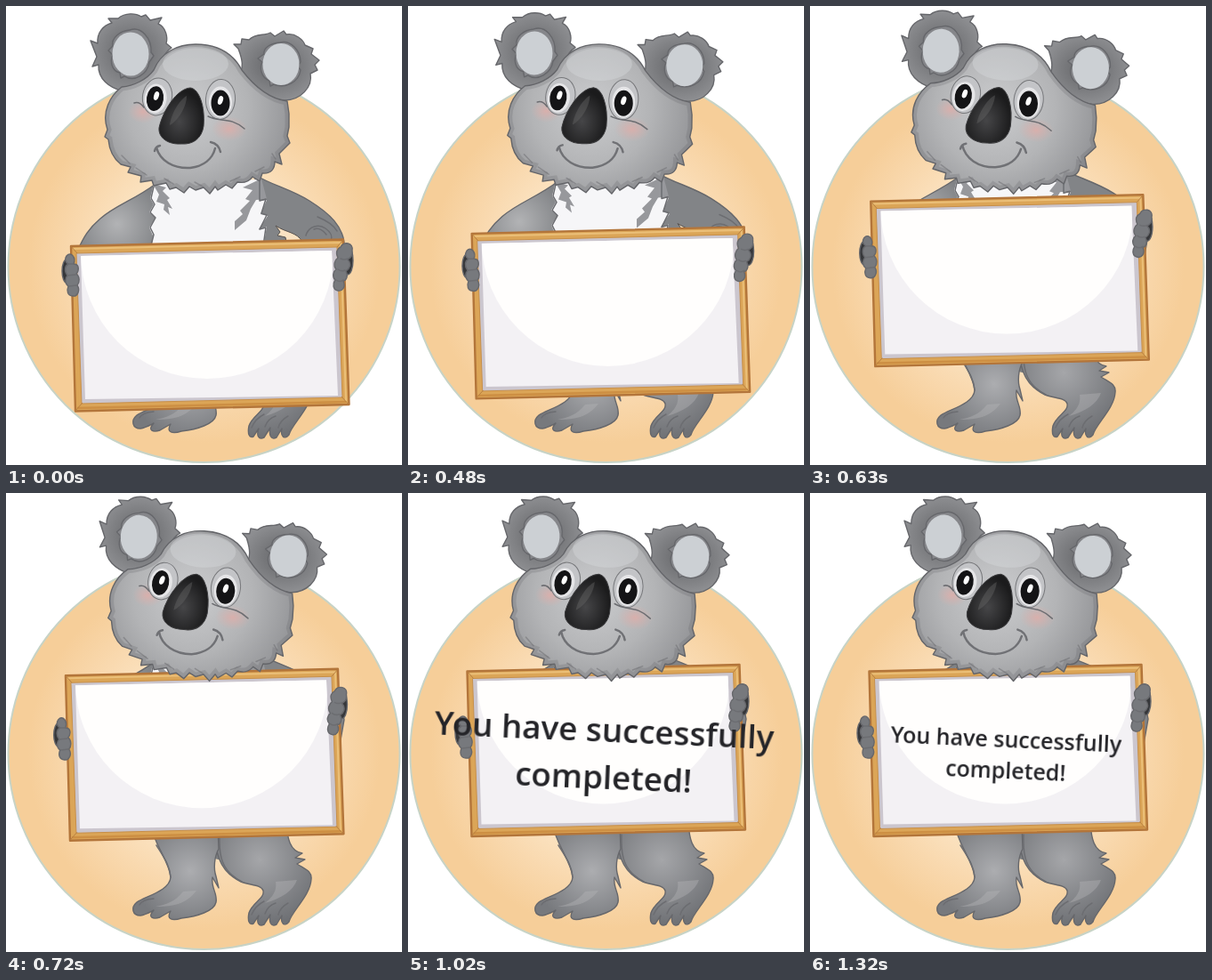
Recreate the animation shown at these times as an HTML page. Size 445 px wide and 516 px high, loop 1.95 s.

```html
<!DOCTYPE html>
<html lang="en">
<head>
<meta charset="utf-8">
<title>Koala with a sign</title>
<style>
@property --rise { syntax: '<number>'; inherits: true; initial-value: 0; }
@property --lid { syntax: '<number>'; inherits: true; initial-value: 0; }
@property --size { syntax: '<number>'; inherits: true; initial-value: 1; }
html, body { margin: 0; width: 100%; height: 100%; overflow: hidden; background: #fff; }
svg {
  display: block; width: 445px; height: 516px;
  animation: rise 1950ms infinite, blink 1950ms infinite, pulse 1950ms infinite;
}
/* --rise: 0 = sign low, 1 = sign held up */
@keyframes rise {
  0%, 20% { --rise: 0; animation-timing-function: steps(3); }
  24.6154% { --rise: .203; animation-timing-function: steps(5); }
  32.3077% { --rise: .725; animation-timing-function: steps(4); }
  38.4615%, 100% { --rise: 1; }
}
@keyframes blink {
  0%, 13.8462%, 53.8462% { --lid: 0; animation-timing-function: steps(2); }
  3.0769%, 10.7692%, 56.9231%, 64.6154% { --lid: .42; animation-timing-function: steps(2); }
  6.1538%, 60% { --lid: 1; animation-timing-function: steps(1); }
  7.6923%, 61.5385% { --lid: 1; animation-timing-function: steps(2); }
  67.6923%, 100% { --lid: 0; }
}
@keyframes pulse {
  0%, 36.9231% { --size: 1.14; animation-timing-function: steps(6); }
  46.1538% { --size: 1.02; animation-timing-function: steps(1); }
  47.6923% { --size: 1; animation-timing-function: steps(3); }
  52.3077% { --size: 1.47; animation-timing-function: steps(3); }
  56.9231% { --size: 1.18; animation-timing-function: steps(2); }
  60%, 100% { --size: 1; }
}
@keyframes fade {
  0%, 36.9231% { opacity: 0; animation-timing-function: steps(6); }
  46.1538% { opacity: .55; animation-timing-function: steps(2); }
  49.2308%, 100% { opacity: 1; }
}
.lift { transform: translate(calc(var(--rise) * var(--dx) * 1px), calc(var(--rise) * var(--dy) * 1px)); }
.arms { --dx: 0; --dy: -12; }
.sign { --dx: -6.5; --dy: -69.5; }
.left { --dx: -10; --dy: -28; }
.right { --dx: -7; --dy: -52; }
.head { transform-origin: 222px 205px; transform: rotate(calc(var(--rise) * 3.7deg)); }
.lid { transform: translateY(calc(var(--lid) * 48px)); fill: #b7abb0; stroke: #7d7377; }
.message { transform-origin: 220px 297px; transform: rotate(2.5deg) scale(var(--size)); animation: fade 1950ms infinite; }
.message text { font: 600 25px "Open Sans", "Noto Sans", sans-serif; fill: #242428; text-anchor: middle; }
.ink { stroke: #66676b; stroke-width: 1.4; stroke-linejoin: round; }
.line { fill: none; stroke: #6c6d71; stroke-width: 1.5; stroke-linecap: round; stroke-linejoin: round; }
.rim { fill: none; stroke: #55565a; stroke-opacity: .2; stroke-width: 9; }
</style>
</head>
<body>
<svg viewBox="0 0 445 516">
  <defs>
    <radialGradient id="sun">
      <stop offset=".3" stop-color="#fdecd2"/><stop offset=".66" stop-color="#f9d9af"/><stop offset=".9" stop-color="#f6ce99"/>
    </radialGradient>
    <radialGradient id="face" gradientUnits="userSpaceOnUse" cx="205" cy="115" r="122">
      <stop offset="0" stop-color="#cbccce"/><stop offset=".55" stop-color="#b3b4b6"/><stop offset="1" stop-color="#929396"/>
    </radialGradient>
    <radialGradient id="ear">
      <stop offset=".4" stop-color="#737477"/><stop offset="1" stop-color="#8d8e91"/>
    </radialGradient>
    <radialGradient id="armL" gradientUnits="userSpaceOnUse" cx="125" cy="245" r="52">
      <stop offset="0" stop-color="#b2b3b5"/><stop offset="1" stop-color="#808285"/>
    </radialGradient>
    <radialGradient id="legL" gradientUnits="userSpaceOnUse" cx="207" cy="425" r="64">
      <stop offset="0" stop-color="#acadb0"/><stop offset="1" stop-color="#77797d"/>
    </radialGradient>
    <radialGradient id="legR" gradientUnits="userSpaceOnUse" cx="285" cy="412" r="74">
      <stop offset="0" stop-color="#a5a6a9"/><stop offset="1" stop-color="#6f7175"/>
    </radialGradient>
    <radialGradient id="nose" cx=".45" cy=".6" r=".55">
      <stop offset="0" stop-color="#464648"/><stop offset="1" stop-color="#1b1b1c"/>
    </radialGradient>
    <radialGradient id="blush">
      <stop offset="0" stop-color="#dcaeaa" stop-opacity=".9"/><stop offset="1" stop-color="#d6b0ac" stop-opacity="0"/>
    </radialGradient>
    <ellipse id="eyeL" cx="170" cy="102" rx="16.500" ry="21" transform="rotate(10 170 102)"/>
    <ellipse id="eyeR" cx="241" cy="105" rx="16.500" ry="22.500" transform="rotate(4 241 105)"/>
    <path id="skull" d="M166 72C174 52 193 43 213 43 237 43 255 53 265 72 278 89 294 104 316 107L318 121 318 136 316 146 319 154 311 162 307 166 310 178 302 175C302 183 298 189 288 188L285 197 277 192C272 199 266 199 260 198L254 205 247 201 238 207 235 203 229 211 222 204 213 207 206 203 200 210 191 204 184 206 180 199 166 202 164 196 151 198 152 191 137 187 140 181 129 178C120 171 116 161 115 150L111 147 114 139C107 119 117 101 130 91 143 90 158 83 166 72Z"/>
    <clipPath id="clipL"><use href="#eyeL"/></clipPath>
    <clipPath id="clipR"><use href="#eyeR"/></clipPath>
    <clipPath id="clipSkull"><use href="#skull"/></clipPath>
    <clipPath id="panel"><path d="M84 281 366 275 373 438 89 442Z"/></clipPath>
  </defs>

  <circle cx="222.5" cy="293" r="220" fill="url(#sun)" stroke="#c7d3c6" stroke-width="2"/>

  <!-- legs -->
  <path d="M170 250H292L314 380 304 408 238 412 172 390Z" fill="#7c7e81"/>
  <path class="ink" fill="url(#legR)" d="M235 370C234 404 239 425 264 437 274 441 287 440 289 447 291 456 277 460 273 472 271 482 274 486 278 484L284 475C281 483 284 488 290 485L297 474C295 483 298 488 304 485L310 475C308 484 313 488 318 482 321 470 342 453 343 434 344 425 336 423 327 417L336 412 325 410 333 405C319 403 316 388 315 370Z"/>
  <path class="ink" fill="url(#legL)" d="M162 370C165 394 184 414 185 432 184 447 158 453 147 460 140 466 142 475 151 475 157 474 162 471 166 469 158 478 166 479 173 477L185 470C179 480 188 481 197 478 215 476 234 470 236 460 238 450 230 444 232 432L239 444 236 431C233 422 234 409 239 400L238 370Z"/>
  <path class="line" stroke-width="2.5" d="M169 396C177 409 184 418 185 432M240 384C239 408 242 425 265 437"/>
  <path class="line" d="M150 463Q153 457 166 456M276 474Q280 464 290 459M291 473Q294 464 303 461M306 474Q308 466 317 461"/>
  <path d="M199 448C190 460 178 463 168 465 192 465 204 460 214 447ZM303 437C305 449 297 456 291 461 309 456 323 447 327 435Z" fill="#b3b4b7" opacity=".4"/>

  <!-- arms and chest -->
  <g class="lift arms">
    <path class="ink" fill="#828487" d="M280 190C300 202 318 205 341 219 365 234 378 248 380 266L374 300H285Z"/>
    <path class="ink" fill="url(#armL)" d="M168 200C146 217 123 224 106 239 93 250 87 260 81 274L88 300H172Z"/>
    <path d="M166 200 162 216 166 223 161 232 168 238 161 249 165 258 161 300H284L293 248 284 251 294 236 286 234 293 218 285 219 285 195Z" fill="#f6f6f8"/>
    <path d="M287 194 266 204 277 207 269 217 274 219 263 230 266 234 257 242 257 252 270 241 275 228 281 218 293 217ZM165 200 172 212 169 220 178 223 177 229 184 235 182 226 187 228 181 218 184 216 176 208 180 204Z" fill="#97989c"/>
    <path class="line" d="M166 203 163 216 167 223 162 232 168 238 162 249 166 257 163 269M285 198 285 219 292 217 287 233 293 235 285 251 292 249 289 270M337 258C340 247 352 245 359 250 366 255 367 259 365 264M346 251Q353 248 360 257M350 237Q367 244 372 253"/>
    <path d="M303 247 308 254 305 258 314 260 315 265H333C327 254 315 255 303 247Z" fill="#fae2c2" stroke="#54504e"/>
  </g>

  <!-- sign -->
  <g class="lift sign">
    <path d="M73 270 379 262.500 385.500 448 78 455.500Z" fill="#dba557" stroke="#b3753a" stroke-width="2.4" stroke-linejoin="round"/>
    <path d="M75 273 376 266 382 444" fill="none" stroke="#ebbf78" stroke-width="2"/>
    <path d="M80 452 382 445" stroke="#cd8f43" stroke-width="2.5"/>
    <path d="M79 278 372 271 378 440 85 447Z" fill="#cbc6ce" stroke="#c78f4a"/>
    <path d="M73 270 80 278M379 263 372 271M385 448 377 439M78 455 86 446" stroke="#b98040"/>
    <path d="M84 281 366 275 373 438 89 442Z" fill="#f3f1f4"/>
    <circle cx="226" cy="277" r="142" fill="#fffefd" clip-path="url(#panel)"/>
  </g>

  <!-- paws -->
  <g class="lift left ink" fill="#77797d">
    <ellipse cx="68" cy="298" rx="5" ry="13" fill="#36373a"/>
    <path d="M68 281C73 275 79 283 76 290 83 290 82 298 79 301 83 304 83 311 80 314 84 320 80 327 75 326 69 326 68 320 70 315 66 312 66 306 69 303 65 298 66 292 70 290 66 288 66 284 68 281Z"/>
    <path class="line" d="M70 290 76 290M69 303 78 302M71 315 79 314"/>
  </g>
  <g class="lift right ink" fill="#77797d">
    <ellipse cx="384" cy="286" rx="6" ry="16" fill="#36373a"/>
    <path d="M376 271C379 264 391 266 389 275 390 281 387 283 384 285 389 290 386 296 382 298 385 304 382 309 379 309 382 316 378 321 373 320 367 319 367 312 370 308 366 304 368 298 371 296 367 291 370 285 373 283 370 277 372 273 376 271Z"/>
    <path class="line" d="M376 284Q380 286 384 284M373 296Q377 299 381 297M371 308Q375 311 379 308"/>
  </g>

  <!-- head -->
  <g class="head">
    <path class="ink" fill="url(#ear)" d="M132 96C116 92 103 82 104 66L97 68 102 57 95 39 103 42C102 30 109 22 119 19L115 14 126 14C134 7 146 8 152 12L157 10 162 16 175 13 171 20C180 24 182 36 180 42L186 47C175 53 176 68 163 79 157 93 146 97 132 96Z"/>
    <path class="ink" fill="url(#ear)" d="M259 82C270 70 264 56 261 48L256 43 264 43 265 37 273 38C281 30 290 34 297 30L302 34 312 28 315 32C325 30 334 38 336 44L345 48 343 54 352 61 347 66 350 72 342 76C345 91 331 106 313 106 295 105 283 98 274 85Z"/>
    <path class="ink" fill="#85868a" d="M139 27C152 22 164 37 163 52L166 56 161 63C159 77 144 86 133 79L129 81 128 75C118 73 117 61 120 55L115 50 120 45C118 36 128 28 139 27Z"/>
    <ellipse cx="140" cy="54" rx="20.500" ry="24.500" fill="#ccd0d4"/>
    <path class="ink" fill="#85868a" d="M308 41C320 38 331 50 331 63L328 68 331 72C329 86 314 93 301 88L297 90 296 84C286 80 285 69 288 63L283 59 290 54C289 47 297 42 308 41Z"/>
    <ellipse cx="309" cy="65.500" rx="20.500" ry="23.500" fill="#ccd0d4"/>

    <use href="#skull" class="ink" fill="url(#face)"/>
    <use href="#skull" class="rim" clip-path="url(#clipSkull)"/>
    <ellipse cx="213" cy="65" rx="37" ry="19" fill="#d8d9db" opacity=".4"/>
    <path class="line" opacity=".5" d="M130 168 139 177M146 182 158 190M178 194 188 200M212 198 221 203M252 197 263 192M280 186 290 181M299 166 303 172"/>
    <ellipse cx="154" cy="119" rx="17" ry="13" fill="url(#blush)"/>
    <ellipse cx="251" cy="138" rx="20" ry="14" fill="url(#blush)"/>

    <g clip-path="url(#clipL)">
      <use href="#eyeL" fill="#c3c4c7"/>
      <ellipse cx="168" cy="104" rx="12.500" ry="16.500" fill="#e6e6e8" transform="rotate(8 168 104)"/>
      <ellipse cx="167.500" cy="104" rx="9.500" ry="14" fill="#141416" transform="rotate(8 167 104)"/>
      <ellipse cx="169" cy="101" rx="2.800" ry="5" fill="#fff" transform="rotate(18 169 101)"/>
      <path class="lid" d="M140 26H200V80Q170 71 140 80Z"/>
    </g>
    <g clip-path="url(#clipR)">
      <use href="#eyeR" fill="#c3c4c7"/>
      <ellipse cx="241" cy="108" rx="13" ry="17.500" fill="#e6e6e8"/>
      <ellipse cx="241" cy="109" rx="10.500" ry="14.500" fill="#141416"/>
      <ellipse cx="241" cy="106" rx="2.800" ry="5" fill="#fff" transform="rotate(18 241 106)"/>
      <path class="lid" d="M210 26H270V84Q241 75 210 83Z"/>
    </g>
    <use href="#eyeL" fill="none" stroke="#77787b"/>
    <use href="#eyeR" fill="none" stroke="#77787b"/>
    <path class="line" d="M227 124C240 131 252 124 268 138M144 109Q150 107 155 114"/>

    <path d="M207 92C217 93 224 113 222 135 220 149 210 156 197 155 182 156 171 148 172 137 176 118 192 93 207 92Z" fill="url(#nose)" stroke="#3a3a3c"/>
    <path d="M203 101C194 106 185 123 184 134 193 129 203 114 203 101Z" fill="#68686a" opacity=".4"/>
    <path d="M169 159C173 174 188 183 207 182 222 180 232 172 235 160M230 153Q239 155 241 164M167 163Q168 158 173 157" fill="none" stroke="#707175" stroke-width="2.500" stroke-linecap="round"/>
  </g>

  <g class="message">
    <text x="219.500" y="285.500">You have successfully</text>
    <text x="220.500" y="321">completed!</text>
  </g>
</svg>
</body>
</html>
```
